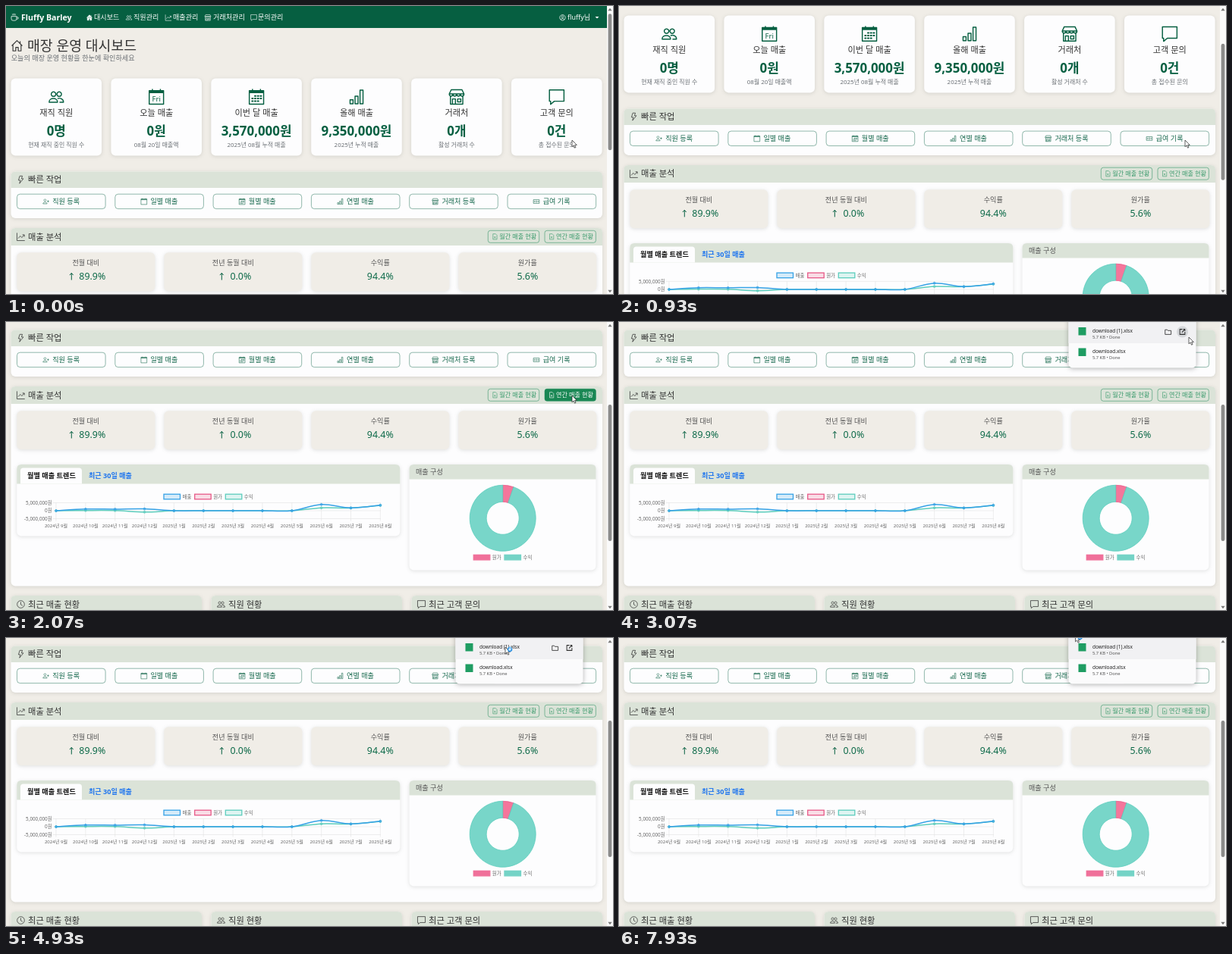
An HTML page that plays this animation: 800x380 px, repeating every 8000 ms.

```html
<!DOCTYPE html>
<html lang="ko">
<head>
<meta charset="utf-8">
<title>매장 운영 대시보드</title>
<style>
html, body { margin: 0; width: 100%; height: 100%; overflow: hidden; background: #f0ede7; }
svg { display: block; width: 800px; height: 380px; }
text { font-family: "Noto Sans", "Noto Sans CJK KR", "Noto Sans CJK JP", "Noto Sans CJK", sans-serif; white-space: pre; }
.card { filter: drop-shadow(0 1px 2.5px rgba(60, 70, 60, .16)); }
.pop { filter: drop-shadow(0 1px 3px rgba(0, 0, 0, .3)); }
</style>
</head>
<body>
<svg id="stage" viewBox="0 0 800 380" xmlns="http://www.w3.org/2000/svg"></svg>
<script>
const LOOP = 8000;
const GREEN = '#065f41', LEAF = '#3b9a6c', LEAF_DARK = '#198754', INK = '#333', GREY = '#6b7075';
const SAGE = '#dbe3d8', SAND = '#f0ede7', WHITE = '#fdfdfe';
const BLUE = '#36a2e6', PINK = '#e75a88', TEAL = '#5ccdbd';

// Line icons on a 16 unit grid
const ring = (x, y, r) => `M${x} ${y - r}a${r} ${r} 0 1 0 .01 0`;
const calendar = 'M.8 1.6h14.4v13.6H.8zM.8 2.6h14.4M.8 3.6h14.4M4 0v1.6M12 0v1.6';
const dots = [6.8, 9.4, 12].map(y => [3.4, 6.2, 9, 11.8].map(x => `M${x} ${y}h1.2v.4h-1.2z`).slice(y < 7 ? 1 : 0, y > 11 ? 3 : 4).join('')).join('');
const icons = {
  house: 'M1.3 8 8 1.4 14.7 8M2.8 6.8v7.8h3.6v-4.5h3.2v4.5h3.6V6.8M12 2.2v2.6',
  people: ring(5.2, 5.2, 2.3) + ring(10.9, 5.2, 2.3) + 'M.8 13.3c0-5 8.4-5 8.4 0zM9.2 9.6c2.5-1 6 .2 6 3.7h-4',
  calendar,
  month: calendar + dots,
  bars: 'M1.5 14.8v-4h3v4zM6.5 14.8v-7.5h3v7.5zM11.5 14.8V1.2h3v13.6z',
  shop: 'M.6 5 2.6.8h10.8L15.4 5c0 2.9-3.7 2.9-3.7 0 0 2.9-3.7 2.9-3.7 0 0 2.9-3.7 2.9-3.7 0 0 2.9-3.7 2.9-3.7 0zM.6 5h14.8M1.8 7.4v7.8h12.4V7.4M3.8 15.2V10h3v5.2M9 10h3.2v3H9z',
  chat: 'M.7.9h14.6v11.4H5.6L1.9 15.4v-3.1H.7z',
  bolt: 'M6 .8h5L9.3 6H13L5.5 15.2 7.2 9H3.5z',
  graph: 'M.7.5v14.8h15M14.5 4.5 10 9.5 7 6.5 3 11M11 4.2h3.8V8',
  clock: ring(8, 8, 7) + 'M8 3.5v5l3.3 2',
  file: 'M3 .8h7l3.5 3.5v11H3zM6 7.5l4 5M10 7.5l-4 5',
  cash: 'M.8 3.5h14.4v9H.8z' + ring(8, 8, 2) + 'M3 6v4M13 6v4',
  plus: ring(6, 4.8, 2.6) + 'M1 13.5c0-5 10-5 10 0zM13.5 5v5M11 7.5h5',
  cup: 'M1.5 6h10v5q0 3-3 3h-4q-3 0-3-3zM11.5 7.5H13q2 0 2 1.8t-2 1.8h-1.5M4 1v3M6.5.5V4M9 1v3',
  user: ring(8, 8, 7) + ring(8, 6.2, 2.5) + 'M3.4 13.2c1.5-3.8 7.7-3.8 9.2 0',
  folder: 'M1 3h5l1.5 2H15v9H1z',
  open: 'M8 2H2v12h12V8M10 2h4v4M14 2 7 9'
};

const icon = (name, cx, cy, size, color, w = 1.1, fill = 'none') =>
  `<path d="${icons[name]}" transform="translate(${cx - size / 2} ${cy - size / 2}) scale(${size / 16})" fill="${fill}" stroke="${color}" stroke-width="${w}" stroke-linejoin="round"/>`;
const text = (s, x, y, size, color = INK, anchor = 'start', weight = 400) =>
  `<text x="${x}" y="${y}" font-size="${size}" fill="${color}" text-anchor="${anchor}" font-weight="${weight}">${s}</text>`;
const mid = (s, x, y, size, color, weight) => text(s, x, y, size, color, 'middle', weight);
const rect = (x, y, w, h, fill, r = 0, extra = '') =>
  `<rect x="${x}" y="${y}" width="${w}" height="${h}" rx="${r}" fill="${fill}" ${extra}/>`;
const card = (x, y, w, h, fill = WHITE) => rect(x, y, w, h, fill, 6, 'class="card"');
const cap = (x, y, w, h, fill = SAGE, r = 6) =>
  `<path d="M${x} ${y + h}v${r - h}q0-${r} ${r}-${r}h${w - 2 * r}q${r} 0 ${r} ${r}v${h - r}z" fill="${fill}"/>`;
const panel = (x, y, w, h, head, name, title) =>
  card(x, y, w, h) + cap(x, y, w, head) + icon(name, x + 13, y + head / 2, 11, INK) +
  text(title, x + 22.5, y + head / 2 + 4, 11.3);

function navbar() {
  const items = [['house', 110, '대시보드', 116], ['people', 162, '직원관리', 168], ['graph', 214, '매출관리', 220],
    ['shop', 266, '거래처관리', 273], ['chat', 326.5, '문의관리', 332]];
  return rect(0, 0, 792, 29, GREEN) + icon('cup', 11.5, 15, 11, '#fff') +
    text('Fluffy Barley', 20, 18.8, 10.6, '#fff', 'start', 700) +
    items.map(([n, ix, s, x], i) => icon(n, ix, 15.3, 8.5, '#fff', 1.1, i ? 'none' : '#fff') + text(s, x, 18.3, 9.1, '#fff')).join('') +
    icon('user', 733.5, 15.3, 8.5, '#fff', 1.4) + text('fluffy님', 740, 18.3, 9, '#fff') +
    '<path d="M776.5 14h5l-2.5 2.6z" fill="#fff"/>';
}

function summary() {
  const cards = [['people', '재직 직원', '0명', '현재 재직 중인 직원 수'], ['calendar', '오늘 매출', '0원', '08월 20일 매출액'],
    ['month', '이번 달 매출', '3,570,000원', '2025년 08월 누적 매출'], ['bars', '올해 매출', '9,350,000원', '2025년 누적 매출'],
    ['shop', '거래처', '0개', '활성 거래처 수'], ['chat', '고객 문의', '0건', '총 접수된 문의']];
  return cards.map(([n, title, value, note], i) => {
    const x = 6.5 + i * 131.9, c = x + 59.8;
    return card(x, 95.5, 119.6, 102) + icon(n, c, 120, 21, GREEN, 1.1) +
      (i === 1 ? mid('Fri', c, 125.7, 9.5, GREEN) : '') +
      mid(title, c, 145.3, 11.2) + mid(value, c, 171, 16.9, GREEN, 700) + mid(note, c, 186, 7.95, GREY);
  }).join('');
}

function quick() {
  const items = [['plus', '직원 등록'], ['calendar', '일별 매출'], ['month', '월별 매출'], ['bars', '연별 매출'],
    ['shop', '거래처 등록'], ['cash', '급여 기록']];
  return panel(6.5, 218.5, 779.5, 61.5, 21.5, 'bolt', '빠른 작업') + items.map(([n, s], i) => {
    const x = 14.5 + i * 129.3, left = x + (i === 4 ? 30 : 34);
    return rect(x, 248.2, 116.6, 19.4, WHITE, 4, `stroke="${GREEN}" stroke-opacity=".8" stroke-width=".55"`) +
      icon(n, left + 4, 258, 8.6, GREEN, 1) + text(s, left + 12.7, 261.2, 9.1, '#17694d');
  }).join('');
}

const report = (x, s, id) => `<g id="${id}">` +
  rect(x, 296.3, 67.4, 16, 'none', 3, `stroke="${LEAF_DARK}" stroke-width=".5"`) +
  icon('file', x + 9, 304.3, 8, LEAF, 1.2) + text(s, x + 15, 307.4, 8.1, LEAF) + '</g>';

function stats() {
  const items = [['전월 대비', '89.9%', 8.5, -19], ['전년 동월 대비', '0.0%', 10, -15], ['수익률', '94.4%', 0], ['원가율', '5.6%', 0]];
  return items.map(([label, value, dx, ax], i) => {
    const x = 14.3 + i * 194, c = x + 91;
    return card(x, 325.3, 182, 51, SAND) + mid(label, c, 341.7, 9.1, '#555') + mid(value, c + dx, 361.2, 12.4, '#0d6a49') +
      (ax ? `<path d="M${c + ax} 361.5v-9m-2.4 2.6 2.4-2.7 2.4 2.7" fill="none" stroke="${GREEN}"/>` : '');
  }).join('');
}

const legend = (x, y, s, color, opacity) =>
  rect(x, y - 3.3, 21.5, 6.6, color, 0, `fill-opacity="${opacity}" stroke="${color}" stroke-width="1.3"`) + text(s, x + 24.5, y + 2.4, 6.4, '#666');

function smooth(pts) {
  let d = `M${pts[0]}`;
  for (let i = 0; i < pts.length - 1; i++) {
    const a = pts[i - 1] || pts[i], b = pts[i], c = pts[i + 1], e = pts[i + 2] || c, k = .17;
    d += `C${b[0] + (c[0] - a[0]) * k} ${b[1] + (c[1] - a[1]) * k} ${c[0] - (e[0] - b[0]) * k} ${c[1] - (e[1] - b[1]) * k} ${c}`;
  }
  return d;
}

function trend() {
  const zero = 457, step = 38.85, px = i => 66 + i * step;
  const plot = (vals, color) => {
    const pts = vals.map((v, i) => [px(i), zero - v]);
    return `<path d="${smooth(pts)}" fill="none" stroke="${color}" stroke-width="1.5"/>` +
      pts.map(([x, y]) => `<circle cx="${x}" cy="${y}" r="1.5" fill="${color}" fill-opacity=".6" stroke="${color}" stroke-width=".6"/>`).join('');
  };
  let s = card(14.3, 396, 505, 94.5) + cap(14.3, 396, 505, 25.5) + cap(19, 400.5, 81, 21, WHITE, 4) +
    text('월별 매출 트렌드', 28, 414.3, 9.2, '#111', 'start', 700) +
    text('최근 30일 매출', 109, 414.3, 9.1, '#1f75ee', 'start', 700) +
    legend(208, 438.5, '매출', BLUE, .2) + legend(248.7, 438.5, '원가', PINK, .2) + legend(289.3, 438.5, '수익', TEAL, .2);
  ['5,000,000원', '0원', '-5,000,000원'].forEach((label, i) => {
    const y = 446.5 + i * 10.5;
    s += `<path d="M62 ${y}H494" stroke="#e2e2e2" stroke-width=".6"/>` + text(label, 60.5, y + 2.3, 6.3, '#666', 'end');
  });
  for (let i = 0; i < 12; i++) {
    const m = (i + 8) % 12 + 1;
    s += `<path d="M${px(i)} 446.5v24" stroke="#e2e2e2" stroke-width=".6"/>` +
      mid(`${i < 4 ? 2024 : 2025}년 ${m}월`, px(i), 478.7, 6.1, '#666');
  }
  return s + plot([0, .3, .2, -1.8, 0, 0, 0, 0, 0, 3.8, 3.6, 7], TEAL) + plot([0, 2.2, 2.1, 2.4, 0, 0, 0, 0, 0, 8.2, 3.7, 7.3], BLUE);
}

function donut() {
  const cx = 654.7, cy = 466.8, R = 43.5, r = 21.5, a = Math.PI * 2 * .053;
  const at = (q, ang) => `${cx + q * Math.sin(ang)} ${cy - q * Math.cos(ang)}`;
  const slice = (from, to, color, edge) => {
    const big = to - from > Math.PI ? 1 : 0;
    return `<path d="M${at(R, from)}A${R} ${R} 0 ${big} 1 ${at(R, to)}L${at(r, to)}A${r} ${r} 0 ${big} 0 ${at(r, from)}z" fill="${color}" stroke="${edge}" stroke-width=".8"/>`;
  };
  return card(531.5, 396, 246, 139.5) + cap(531.5, 396, 246, 19.5) + text('매출 구성', 540, 408.8, 9.1, '#555') +
    slice(0, a, '#f4769b', PINK) + slice(a, Math.PI * 2, '#78d6c9', TEAL) +
    legend(616.3, 518.6, '원가', '#f0709a', 1) + legend(657, 518.6, '수익', '#74d3c6', 1);
}

const page = '<g id="page">' + navbar() + icon('house', 14.5, 52.5, 16.5, INK) +
  text('매장 운영 대시보드', 28, 58.8, 18.3) + text('오늘의 매장 운영 현황을 한눈에 확인하세요', 6.7, 71.6, 9.15, GREY) +
  summary() + quick() +
  panel(6.5, 293, 779.5, 263.5, 23, 'graph', '매출 분석') +
  report(635.3, '월간 매출 현황', 'monthly') + report(710, '연간 매출 현황', 'yearly') +
  stats() + trend() + donut() +
  panel(6.5, 569, 251.5, 60, 23, 'clock', '최근 매출 현황') +
  panel(270.5, 569, 251.5, 60, 23, 'people', '직원 현황') +
  panel(534.5, 569, 251.5, 60, 23, 'chat', '최근 고객 문의') + '</g>';

const scrollbar = rect(792, 0, 8, 380, '#fafafa') +
  '<path d="M793.3 6.3 796 2.8l2.7 3.5zM793.3 374.7l2.7 3.5 2.7-3.5z" fill="#777"/>' +
  rect(793.6, 10, 4.8, 180, '#8a8a8a', 2.4, 'id="thumb"');

const entry = (name, y) => rect(605.5, y - 5.5, 10, 10.5, '#1f9d63') +
  text(name, 624, y + 1.4, 6.5, '#222') + text('5.7 KB • Done', 624, y + 9.4, 5.75, '#555');
const popup = '<g id="popup">' + rect(592.5, -10, 168, 70.5, '#fbfbfc', 5, 'class="pop"') +
  rect(592.5, 0, 168, 28, '#f1f1f3', 0, 'id="row"') + entry('download (1).xlsx', 12.5) + entry('download.xlsx', 40) +
  '<g id="tools"><circle id="halo" cx="742.5" cy="13" r="7.5" fill="#d5d7da"/>' +
  icon('folder', 723.7, 13, 9, '#444', 1.7) + icon('open', 742.5, 13, 9, '#333', 1.8) + '</g></g>';

const pointer = '<g id="cursor"><path d="M0 0V8.8L2.1 7 3.5 10.2 5 9.5 3.6 6.4H6.3z" fill="#fff" stroke="#222" stroke-width=".7"/>' +
  '<g id="busy"><circle cx="6" cy="3" r="2.5" fill="#cfe8fb" stroke="#2a8fe0" stroke-width="1.5"/>' +
  '<path d="M6 .5a2.5 2.5 0 0 1 2.5 2.5" fill="none" stroke="#8cc8f5" stroke-width="1.5"/></g></g>';

document.getElementById('stage').innerHTML = rect(0, 0, 800, 380, SAND) + page + scrollbar + popup + pointer;

const el = id => document.getElementById(id);
const [pageEl, thumb, yearly, popEl, row, tools, halo, cursor, busy] =
  ['page', 'thumb', 'yearly', 'popup', 'row', 'tools', 'halo', 'cursor', 'busy'].map(el);
const [yearBox, yearIcon, yearText] = yearly.children;

const ramp = (t, from, to) => Math.min(1, Math.max(0, (t - from) / (to - from)));
const ease = p => p * p * (3 - 2 * p);
const show = (node, on) => node.setAttribute('visibility', on ? 'visible' : 'hidden');

// Pointer stops: start, end, x, y
const moves = [[1700, 2050, 746, 97], [2750, 3030, 751, 20], [3450, 3900, 658, 12], [5300, 5600, 657, 8], [6820, 7250, 601.5, -4]];

// Five wheel notches
function scrollAt(t) {
  let y = 0;
  for (let i = 0; i < 5; i++) y += 41.6 * ease(ramp(t, 653 + 141.6 * i, 793 + 141.6 * i));
  return y;
}

function render(t) {
  const y = scrollAt(t);
  pageEl.setAttribute('transform', `translate(0 ${-y})`);
  thumb.setAttribute('y', 10.3 + y * .475);

  let cx = 746, cy = 177;
  for (const [from, to, x, ny] of moves) {
    const p = ease(ramp(t, from, to));
    cx += (x - cx) * p;
    cy += (ny - cy) * p;
  }
  cursor.setAttribute('transform', `translate(${cx} ${cy})`);

  const over = cx > 710 && cx < 777 && cy > 88 && cy < 105;
  yearBox.setAttribute('fill', over ? LEAF_DARK : 'none');
  yearIcon.setAttribute('stroke', over ? '#fff' : LEAF);
  yearText.setAttribute('fill', over ? '#fff' : LEAF);

  const p = ease(ramp(t, 2700, 2850));
  const open = p > 0;
  show(popEl, open);
  popEl.setAttribute('opacity', p);
  show(row, open && cy < 28);
  show(tools, open && cy < 28 && cx > 605);
  show(halo, open && cy < 28 && cx > 734);
  show(busy, t > 4250);
  busy.setAttribute('transform', `rotate(${t * .36 % 360} 6 3)`);
}

function tick() {
  render(performance.now() % LOOP);
  requestAnimationFrame(tick);
}
tick();
</script>
</body>
</html>
```
